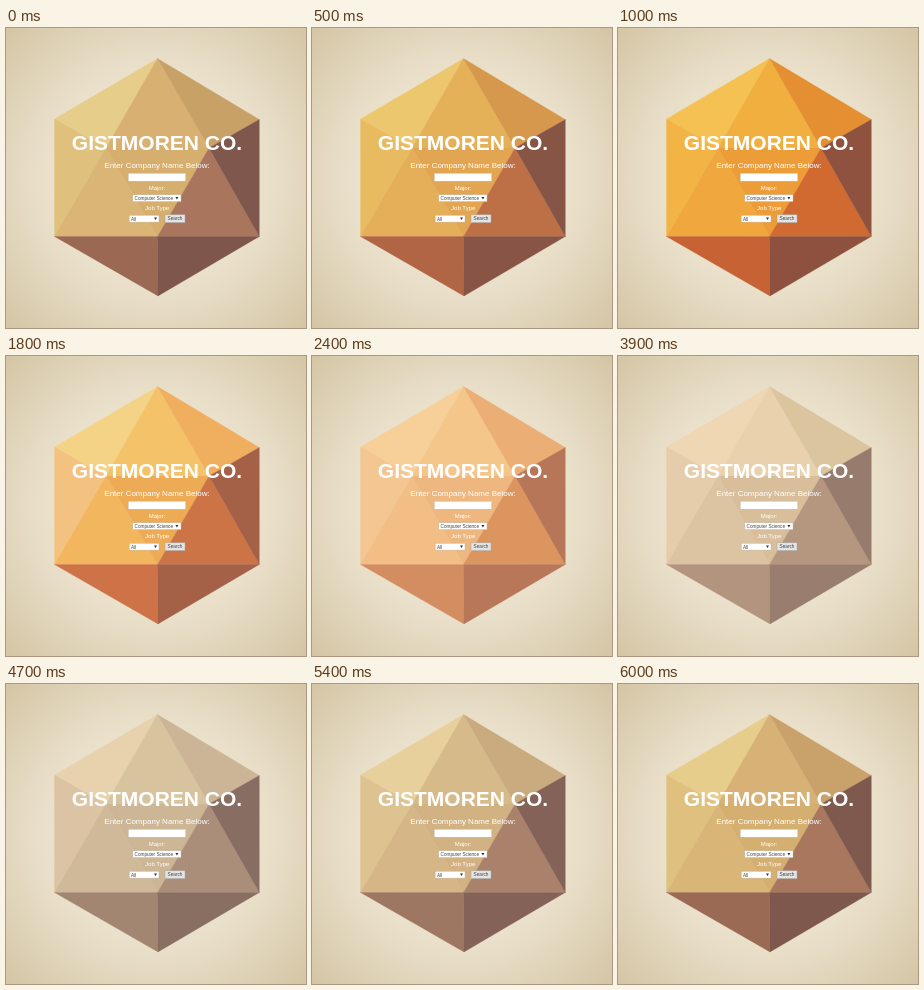
Write an HTML page that moves like this. It is 300 px wide and 300 px high and loops after 6.1 s.

```html
<!DOCTYPE html>
<html lang="en">
<head>
<meta charset="utf-8">
<title>Company search</title>
<style>
  html, body { margin: 0; width: 100%; height: 100%; overflow: hidden; }
  svg { display: block; width: 100vw; height: 100vh; }
  text { font-family: "Liberation Sans", Arial, sans-serif; fill: #fff; }
  .mid { text-anchor: middle; }
  .title { font-size: 21px; font-weight: bold; }
  .lead { font-size: 8px; }
  .label { font-size: 6px; }
  .field { font-size: 4.7px; fill: #444; }
  .box { fill: #fff; stroke: #b8b0a0; stroke-width: .4; }
  .button { fill: #e4e4e4; stroke: #a5a5a5; stroke-width: .5; }
  .arrow { fill: #333; }
</style>
</head>
<body>
<svg viewBox="0 0 300 300">
  <defs>
    <radialGradient id="glow" gradientUnits="userSpaceOnUse" cx="150" cy="150" r="212">
      <stop offset="0" stop-color="#f3ecdd"/>
      <stop offset=".55" stop-color="#e9dfc9"/>
      <stop offset="1" stop-color="#d4c5a4"/>
    </radialGradient>
  </defs>
  <rect width="300" height="300" fill="url(#glow)"/>
  <g id="gem" stroke-width=".3" stroke-linejoin="round"></g>

  <text class="mid title" x="151" y="122">GISTMOREN CO.</text>
  <text class="mid lead" x="151" y="139.8">Enter Company Name Below:</text>
  <rect class="box" x="122.2" y="145.2" width="57.6" height="8"/>
  <text class="mid label" x="151" y="162">Major:</text>
  <rect class="box" x="126.8" y="166.8" width="48.2" height="6.8"/>
  <text class="field" x="128.5" y="171.9">Computer Science</text>
  <path class="arrow" d="M169.4 169h3l-1.5 2.6z"/>
  <text class="mid label" x="151.2" y="181.8">Job Type</text>
  <rect class="box" x="123.2" y="187.3" width="29.8" height="6.8"/>
  <text class="field" x="125" y="192.5">All</text>
  <path class="arrow" d="M148 189.4h3l-1.5 2.6z"/>
  <rect class="button" x="159" y="186.8" width="20" height="7.8"/>
  <text class="mid field" x="169" y="192.4">Search</text>
</svg>
<script>
  const points = {
    top: [151.5, 30.5], ul: [48.5, 91], ur: [253.3, 91.5],
    ll: [48.5, 208.5], lr: [253.3, 208.5], bottom: [152, 268],
    a: [100, 120], b: [203, 120], c: [151.5, 208.5]
  };
  const faces = [
    'top ul a', 'top a b', 'top ur b', 'ul ll a', 'a ll c',
    'a b c', 'b lr c', 'ur lr b', 'll c bottom', 'c lr bottom'
  ];
  // Each palette lists the face colours in order.
  const palettes = [
    [0,    'e6cd89 d7b072 c8a167 dfc07c dab575 d6ae6d a9755c 7f574c 9a6853 7e564b'],
    [1000, 'f4c152 f0af3e e48f32 f2b545 f0a83e ed9d38 d16a30 8f523f c66234 8f513f'],
    [1700, 'f4d386 f4c369 f0ae5f f3c280 f2b65f eeab56 cd7446 a46148 ce7248 a46148'],
    [2200, 'f6cf99 f4c68a ebae74 f4c691 f2be86 efb780 dc955f b87658 d48d60 b87759'],
    [3700, 'efd7b3 ead1ae dac59f e5ccab dcc3a2 d9be9b b5977f 977b6c b3947f 997d6e'],
    [4500, 'e8d2ae d7c49f ccb597 dcc3a3 cfb998 cdb696 aa8e79 886d62 a28671 896e62']
  ].map(([at, list]) => ({ at, colors: list.split(' ').map(rgb) }));

  const loop = 6100, step = 100;
  const holds = [1700, 2100];
  palettes.push({ at: loop - holds.length * step, colors: palettes[0].colors });

  function rgb(hex) {
    return [0, 2, 4].map(i => parseInt(hex.slice(i, i + 2), 16));
  }

  const gem = document.getElementById('gem');
  const polygons = faces.map(face => {
    const el = document.createElementNS('http://www.w3.org/2000/svg', 'polygon');
    el.setAttribute('points', face.split(' ').map(name => points[name]).join(' '));
    return gem.appendChild(el);
  });

  function draw(now) {
    const time = Math.floor((now % loop) / step) * step;
    const pos = time - step * holds.filter(h => time >= h).length;
    const i = palettes.findIndex(p => p.at > pos);
    const from = palettes[i - 1], to = palettes[i];
    const mix = (pos - from.at) / (to.at - from.at);
    polygons.forEach((el, k) => {
      const color = from.colors[k].map((v, j) => Math.round(v + (to.colors[k][j] - v) * mix));
      const paint = `rgb(${color})`;
      el.setAttribute('fill', paint);
      el.setAttribute('stroke', paint);
    });
  }

  function tick() {
    draw(performance.now());
    requestAnimationFrame(tick);
  }
  tick();
</script>
</body>
</html>
```
